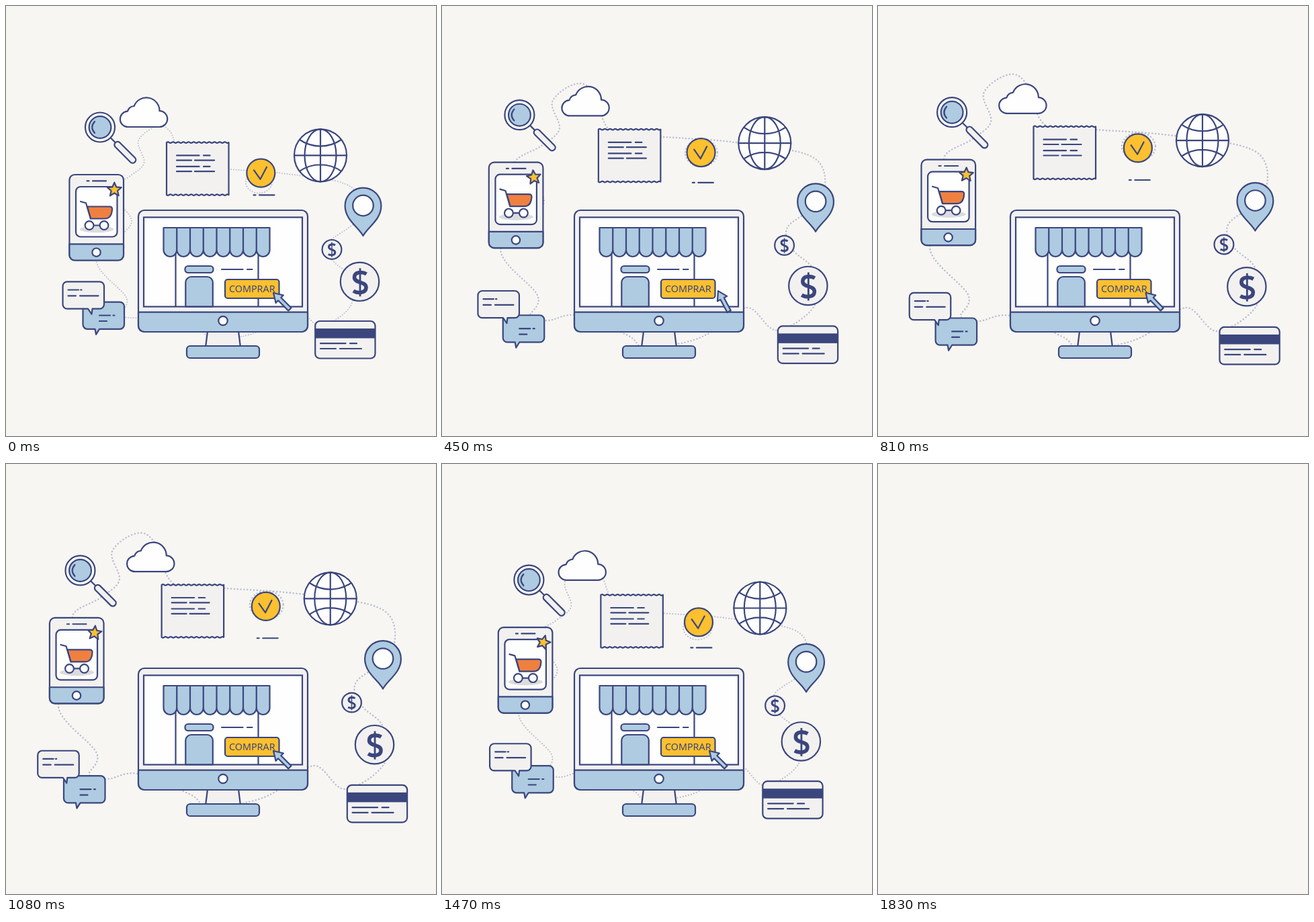
An HTML page for the animation above (1860 ms loop, 640 by 640 pixels).

```html
<!DOCTYPE html>
<html lang="es">
<head>
<meta charset="utf-8">
<style>
  html, body { margin: 0; width: 100%; height: 100%; overflow: hidden; background: #f7f6f2; }
  svg { display: block; width: 100%; height: 100%; }
  #scene { fill: none; stroke: #3b467d; stroke-width: 2.2; stroke-linecap: round; stroke-linejoin: round; }
  .blue { fill: #aecbe1; }
  .pale { fill: #f2f1f0; }
  .white { fill: #fefefe; }
  .gold { fill: #fdc02f; }
  .orange { fill: #f08040; }
  .navy { fill: #3b467d; stroke: none; }
  .shade { fill: #dcdcdf; stroke: none; }
  text { fill: #3b467d; stroke: none; text-anchor: middle; font: 14.35px "Noto Sans", "Open Sans", sans-serif; }
  #trail { stroke: #bbbdd4; stroke-width: 2.6; stroke-dasharray: 0 4.9; }
</style>
</head>
<body>
<svg viewBox="0 0 640 640">
<defs>
  <g id="dollar" stroke-linecap="butt">
    <path d="M9.500 -12.500C4 -15.800 -8.500 -16.500 -8.500 -7.500C-8.500 2 9 -2 9 7.500C9 16.500 -4 16.500 -10 12.800" stroke-width="5.600"/>
    <path d="M0 -21V21" stroke-width="2.800"/>
  </g>
</defs>
<g id="scene">
  <g id="trail">
    <path id="road"/>
    <ellipse cx="388" cy="209" rx="25" ry="21"/>
  </g>

  <g data-move="10.4 -20.2">
    <path class="white" d="M182 180H228.1A11.9 11.9 0 0 0 228.5 156.2A19.6 19.6 0 0 0 190.6 149A10 10 0 0 0 181 156.700A11.650 11.650 0 0 0 182 180Z"/>
  </g>

  <g data-move="-30 -22.4">
    <path d="M155.5 196L164 204.5"/>
    <rect class="pale" x="-4.7" width="9.4" height="41" rx="4.5" transform="translate(162.8 203.3) rotate(-45)"/>
    <circle class="white" cx="140" cy="180.5" r="22"/>
    <circle class="blue" cx="140" cy="180.5" r="16.4"/>
    <path d="M132 172Q124.5 180.5 132 189"/>
  </g>

  <g data-move="-30 -22.4">
    <rect class="pale" x="94.4" y="251" width="80.6" height="127.5" rx="8"/>
    <path class="blue" d="M94.4 354.3H175V370.5a8 8 0 0 1-8 8H102.4a8 8 0 0 1-8-8Z"/>
    <circle class="white" cx="134.5" cy="366.7" r="6.2"/>
    <rect class="white" x="104" y="269" width="61.5" height="74.5" rx="7"/>
    <path d="M120.5 260.3h3M129 260.3h20"/>
    <ellipse class="shade" cx="135" cy="332.3" rx="25.5" ry="5"/>
    <path class="orange" d="M121 298.5H154Q158.5 298.5 158 303Q157 316.5 147 316.5H126Z"/>
    <path d="M111 291L119 293.3L126 316.5M130 326.5H140"/>
    <circle class="white" cx="124" cy="326.5" r="6.4"/>
    <circle class="white" cx="146" cy="326.5" r="6.4"/>
    <path id="star" class="gold"/>
  </g>

  <g data-move="-7.5 -23.8">
    <path id="receipt" class="pale"/>
    <path id="lines" d="M254 222.400H287.500M294 222.400H303.500M254 229.700H276M281 229.700H310"/>
    <use href="#lines" y="16.500"/>
  </g>

  <g data-move="7.6 -37.3">
    <circle class="gold" cx="379.300" cy="248.600" r="21"/>
    <path d="M369 244.300L378.500 257.800L388 239.700"/>
  </g>
  <g data-move="5.3 -22.4"><path d="M368.500 281.300h3M377 281.300H399.500"/></g>

  <g data-move="15 -22.4">
    <circle class="white" cx="468" cy="222.400" r="39"/>
    <ellipse cx="468" cy="222.400" rx="23.500" ry="39"/>
    <path d="M468 183.400v78M429 222.400h78M437 199a55 55 0 0 0 62 0M437 245.800a55 55 0 0 1 62 0"/>
  </g>

  <g data-move="30 -7.5">
    <path class="blue" d="M531.500 342C524.500 329 504.600 318 504.600 297.500a26.900 26.900 0 0 1 53.800 0C558.400 318 538.500 329 531.500 342Z"/>
    <circle class="white" cx="531.500" cy="297" r="15.300"/>
  </g>

  <g data-move="30 -7.5">
    <circle class="pale" cx="485" cy="362.400" r="14.400"/>
    <use href="#dollar" transform="translate(485 362.700) scale(.53)"/>
  </g>
  <g data-move="22.4 7.5">
    <circle class="pale" cx="526.500" cy="410.300" r="28.700"/>
    <use href="#dollar" transform="translate(527 411.300)"/>
  </g>

  <g data-move="48.4 9">
    <rect class="pale" x="460.200" y="469" width="89.300" height="55.500" rx="7"/>
    <rect class="navy" x="460.200" y="480" width="89.300" height="14.500"/>
    <path d="M468 502.200H505.500M512 502.200H522M468 510H491M497 510H529"/>
  </g>

  <g data-move="-29 24">
    <path id="reply" class="blue"/>
    <path d="M139 460.500H155M159.500 460.500h2M139 469H150"/>
  </g>
  <g data-move="-37.9 16.6">
    <path id="message" class="pale"/>
    <path d="M92.500 422.500H108M111 422.500h1.500M92.500 431.300H104M110 431.300H137.500"/>
  </g>

  <path class="pale" d="M300 484H346L349 508H297Z"/>
  <rect class="blue" x="269" y="506" width="108" height="18" rx="5"/>
  <rect class="pale" x="197" y="304" width="252" height="181" rx="9"/>
  <path class="blue" d="M197 455.700H449V476a9 9 0 0 1-9 9H206a9 9 0 0 1-9-9Z"/>
  <rect class="white" x="205" y="314.500" width="236" height="133" stroke-linejoin="miter"/>
  <circle class="white" cx="323" cy="468.500" r="6.700"/>
  <path d="M252.500 366V447M375.500 366V447M321 392H352.500M359 392H366.500"/>
  <path id="awning" class="blue"/>
  <rect class="blue" x="266.500" y="387" width="42" height="10" rx="4.500"/>
  <path class="blue" d="M267.300 447.300V411.500a8.500 8.500 0 0 1 8.500-8.500h23.500a8.500 8.500 0 0 1 8.500 8.500V447.300Z"/>
  <rect class="gold" x="326" y="407" width="80.500" height="28" rx="4"/>
  <text x="366.300" y="426.200">COMPRAR</text>
  <g id="cursor"><path class="blue" d="M0 0L8 13H3V34.500H-3V13H-8Z" transform="translate(398 427) rotate(-45)"/></g>
</g>
</svg>
<script>
const LOOP = 1860, STEP = 30, HALF = 900, CLICK = 450, HIDE = 1830;
const $ = id => document.getElementById(id);
const setD = (id, d) => $(id).setAttribute('d', d);
const place = (id, value) => $(id).setAttribute('transform', value);

// Closed Catmull-Rom curve through "x,y" key points.
function smooth(keys) {
  const pts = keys.trim().split(/\s+/).map(p => p.split(',').map(Number));
  const at = i => pts[(i + pts.length) % pts.length];
  return 'M' + pts[0] + pts.map((b, i) => {
    const a = at(i - 1), c = at(i + 1), e = at(i + 2);
    const p = b.map((v, k) => v + (c[k] - a[k]) / 6);
    const q = c.map((v, k) => v - (e[k] - b[k]) / 6);
    return `C${p} ${q} ${c}`;
  }).join('');
}

setD('road', smooth(`
  459,449 505,484 563,447 562,391 530,359 522,324 575,280 563,217 442,193 326,184
  250,178 218,112 190,103 157,130 168,172 140,198 98,228 144,286 77,358 134,430
  123,462 150,469 196,461 274,492 300,511 362,503 403,487`));

// Speech bubble with a tail `tail` px from its left edge.
const bubble = (x, y, tail, lean) =>
  `M${x + 6.5} ${y}h48.5a6.5 6.5 0 0 1 6.5 6.5v27.200a6.5 6.5 0 0 1 -6.5 6.5` +
  `H${x + tail}l${lean} 8l${-6.5 - lean} -8H${x + 6.5}a6.5 6.5 0 0 1 -6.5 -6.5` +
  `v-27.200a6.5 6.5 0 0 1 6.5 -6.5Z`;
setD('message', bubble(84.5, 410.4, 44, -1));
setD('reply', bubble(114.5, 440.6, 24.5, -5));

const wave = dir => `q${dir * 1.93} -1.5 ${dir * 3.854} 0t${dir * 3.854} 0`;
setD('receipt', `M239 203.200${wave(1).repeat(12)}V281.200${wave(-1).repeat(12)}Z`);

const stripe = (_, i) => `M${234.5 + i * 19.75} 330h19.75v33a9.875 10 0 0 1 -19.75 0Z`;
setD('awning', Array.from({ length: 8 }, stripe).join(''));

const tips = Array.from({ length: 10 }, (_, i) => {
  const r = i % 2 ? 5 : 10.8, a = (i / 5 - 0.5) * Math.PI;
  return [r * Math.cos(a), r * Math.sin(a)];
});
setD('star', 'M' + tips.join('L') + 'Z');

// Same curve as cubic-bezier(.7, 0, 0, 1).
function ease(x) {
  let lo = 0, hi = 1;
  for (let i = 0; i < 30; i++) {
    const p = (lo + hi) / 2;
    if (2.1 * p * (1 - p) ** 2 + p ** 3 < x) lo = p; else hi = p;
  }
  return lo * lo * (3 - 2 * lo);
}

// Eased trip out and back; each way takes `half` ms.
const swing = (t, half) => ease(Math.max(0, 1 - Math.abs(t - half) / half));

const movers = [...document.querySelectorAll('[data-move]')]
  .map(el => [el, ...el.dataset.move.split(' ').map(Number)]);

function draw(now) {
  const t = Math.floor(now % LOOP / STEP) * STEP;
  const u = swing(t, HALF);
  $('scene').style.display = t >= HIDE ? 'none' : '';
  for (const [el, dx, dy] of movers) {
    el.setAttribute('transform', `translate(${dx * u} ${dy * u})`);
  }
  place('trail', `translate(336 448) scale(${0.777 + 0.223 * u}) translate(-336 -448)`);
  place('star', `translate(161.3 273.5) rotate(${-360 * u})`);
  place('cursor', `rotate(${17 * swing(t, CLICK)} 414 469)`);
}

const start = performance.now();
function tick() {
  draw(performance.now() - start);
  requestAnimationFrame(tick);
}
tick();
</script>
</body>
</html>
```
